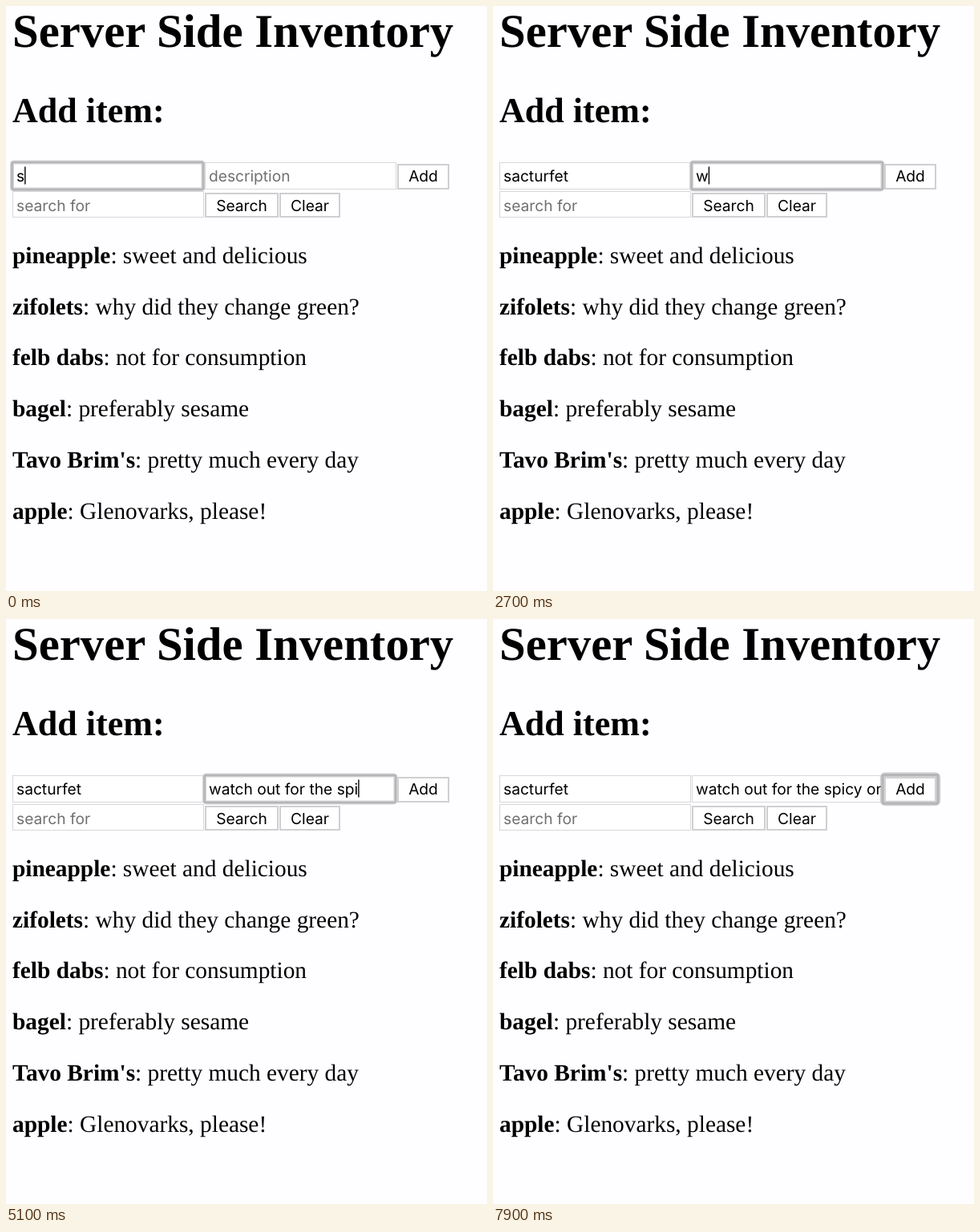
An HTML page for the animation above (8 s loop, 600x730 px).

```html
<!DOCTYPE html>
<html lang="en">
<head>
<meta charset="utf-8">
<title>Inventory</title>
<style>
  html, body { margin: 0; width: 100%; height: 100%; overflow: hidden; background: #fefdff; }
  svg { display: block; }
  text { white-space: pre; text-rendering: geometricPrecision; }
  .page { font-family: "Liberation Serif", Times, serif; font-size: 29.36px; }
  .page .h1 { font-size: 2em; }
  .page .h2 { font-size: 1.5em; }
  .bold { font-weight: bold; }
  .form { font-family: Inter, Roboto, sans-serif; font-size: 19.2px; }
  .hint { fill: #707070; }
  .field { fill: #fff; stroke: #d8d7da; }
  .button { fill: #fff; stroke: #d0cfd2; stroke-width: 2; }
  .ring { fill: none; }
</style>
</head>
<body>
<svg width="600" height="730" viewBox="0 0 600 730">
  <defs>
    <clipPath id="descClip"><rect x="251" y="196" width="232.5" height="32"/></clipPath>
  </defs>
  <g class="page" id="page">
    <text class="h1 bold" x="8" y="51">Server Side Inventory</text>
    <text class="h2 bold" x="8" y="145">Add item:</text>
  </g>
  <g class="form">
    <rect class="field" x="8.5" y="195.5" width="238" height="33"/>
    <rect class="field" x="248.5" y="195.5" width="238" height="33"/>
    <rect class="field" x="8.5" y="231.5" width="238" height="32"/>
    <rect class="button" x="489" y="198" width="63" height="30"/>
    <rect class="button" x="249" y="234" width="90" height="29"/>
    <rect class="button" x="342" y="234" width="74" height="29"/>
    <g id="ring"><rect class="ring"/><rect class="ring"/></g>
    <text class="hint" x="13" y="256">search for</text>
    <g text-anchor="middle">
      <text x="520.5" y="219">Add</text>
      <text x="294" y="256">Search</text>
      <text x="379" y="256">Clear</text>
    </g>
    <text id="name" x="13" y="219"></text>
    <text class="hint" id="hint" x="253" y="219">description</text>
    <g clip-path="url(#descClip)"><text id="desc" x="253" y="219"></text></g>
    <rect id="caret" y="200.5" width="1.4" height="22"/>
  </g>
</svg>
<script>
const LOOP = 8000;
const $ = id => document.getElementById(id);

const items = [
  ["pineapple", "sweet and delicious"],
  ["zifolets", "why did they change green?"],
  ["felb dabs", "not for consumption"],
  ["bagel", "preferably sesame"],
  ["Tavo Brim's", "pretty much every day"],
  ["apple", "Glenovarks, please!"],
];
$("page").insertAdjacentHTML("beforeend", items.map(([item, note], i) =>
  `<text x="8" y="${321 + 63.7 * i}"><tspan class="bold">${item}</tspan>: ${note}</text>`).join(""));

// Key press times in tenths of a second, one per character.
const nameKeys = [0, 3, 7, 10, 11, 12, 13, 13, 14];
const descKeys = [27, 28, 29, 30, 31, 33, 34, 35, 36, 37, 39, 40, 41, 42, 43,
  44, 45, 47, 48, 50, 51, 56, 63, 65, 70, 72, 73, 75];
const typed = (text, keys, tick) => text.slice(0, keys.filter(k => k <= tick).length);

function setAttrs(el, attrs) {
  for (const key in attrs) el.setAttribute(key, attrs[key]);
}

// Focus ring: a soft wide band with a darker core around a control's box.
function drawRing(x, y, w, h, band, opacity) {
  const [outer, core] = $("ring").children;
  const box = { x, y, width: w, height: h };
  setAttrs(outer, { ...box, rx: band / 2, "stroke-width": band, stroke: "#d4d3d6" });
  setAttrs(core, { ...box, rx: 1.5, "stroke-width": band / 2, stroke: "#b6b5b8" });
  setAttrs($("ring"), { opacity });
}

function caretOpacity(tick) {
  if (tick === 22 || tick === 26 || tick === 60) return 0.5;
  const hidden = (tick > 22 && tick < 26) || tick === 61 || tick === 62 || tick >= 78;
  return hidden ? 0 : 1;
}

function draw(time) {
  const tick = Math.floor(time / 100);
  const inName = tick < 17, inButton = tick >= 78;
  const name = $("name"), desc = $("desc");

  name.textContent = typed("sacturfet", nameKeys, tick);
  desc.textContent = typed("watch out for the spicy ones", descKeys, tick);
  $("hint").style.display = desc.textContent ? "none" : "";

  const active = inName ? name : desc;
  const width = active.getComputedTextLength();
  // A focused field scrolls so that its caret stays in view.
  const scroll = inName || inButton ? 0 : Math.max(0, width - 228);
  desc.setAttribute("x", 253 - scroll);
  setAttrs($("caret"), { x: (inName ? 13 : 253) + width - scroll, opacity: caretOpacity(tick) });

  if (inButton) {
    const fresh = tick === 78;
    drawRing(486, 194.5, 69, 35.5, fresh ? 8 : 6.5, fresh ? 0.6 : 1);
  } else {
    const fresh = tick === 17;
    drawRing(inName ? 7.5 : 247.5, 195, 238.5, 34, fresh ? 6.5 : 5, fresh ? 0.6 : 1);
  }
}

const start = performance.now();
function frame() {
  draw((performance.now() - start) % LOOP);
  requestAnimationFrame(frame);
}
frame();
</script>
</body>
</html>
```
